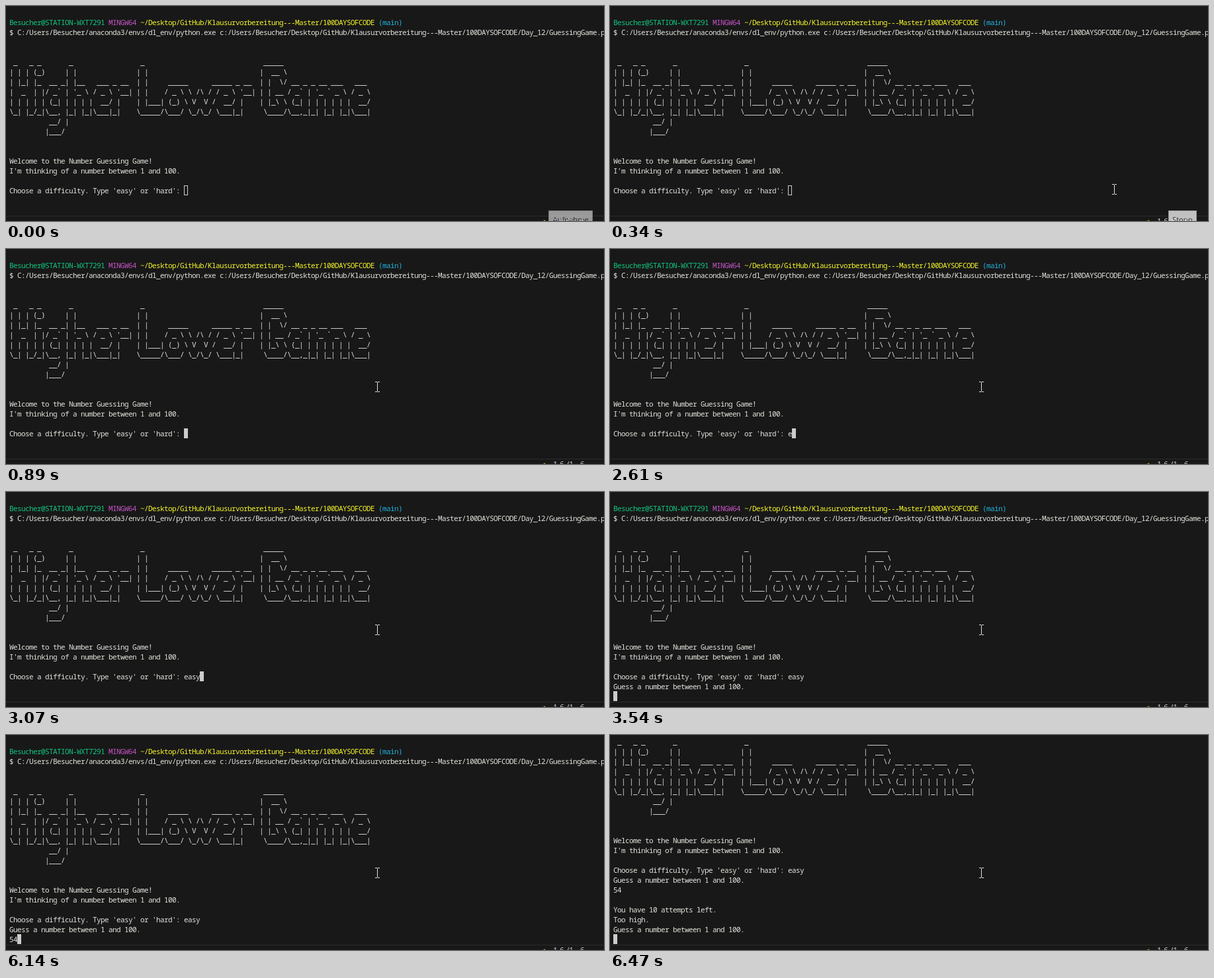
Animation of 904 by 326 pixels, one loop 8 s. Source, as an HTML page:

```html
<!DOCTYPE html>
<html lang="en">
<head>
<meta charset="utf-8">
<title>Number guessing game</title>
<style>
  html, body { margin: 0; width: 100%; height: 100%; overflow: hidden; background: #181818; }
  svg { display: block; width: 904px; height: 326px; }
  text { white-space: pre; }
  #log text { font: 500 11px "Noto Sans Mono", monospace; letter-spacing: -.6px; fill: #e2e2dc; }
  #log .user { fill: #0fc781; }
  #log .sys { fill: #c653c6; }
  #log .dir { fill: #f5f52a; }
  #log .branch { fill: #22b2dc; }
  .status { font: 12px "Open Sans", sans-serif; fill: #ccc; }
  .tip rect { fill: #f0f0f0; stroke: #b8b8b8; }
  .tip text { font: 11.2px "Open Sans", sans-serif; fill: #333; }
</style>
</head>
<body>
<svg viewBox="0 0 904 326">
  <rect width="904" height="326" fill="#181818"/>
  <g id="log"></g>
  <rect id="caret" width="6" height="15" fill="#ccc"/>
  <rect id="hollow" x="269.5" y="272.5" width="5" height="14" fill="none" stroke="#ccc"/>
  <rect y="318" width="904" height="1" fill="#2b2b2b"/>
  <circle cx="814" cy="326" r="1.5" fill="#c98a3a"/>
  <text class="status" x="827" y="331">1 6 /1 . 6</text>
  <g class="tip" id="record">
    <rect x="820.5" y="310.5" width="66" height="24"/>
    <text x="826.5" y="328">Aufnahme</text>
  </g>
  <g class="tip" id="stop">
    <rect x="844.5" y="310.5" width="42" height="24"/>
    <text x="850" y="328">Stopp</text>
  </g>
  <path id="mouse" d="M-3 -7.5H0M1 -7.5H4M.5 -7V7M-3 7.5H0M1 7.5H4" fill="none" stroke="#e4e4e4"/>
</svg>
<script>
const LOOP = 8000, CELL = 6, ROW = 15, LEFT = 5, TOP = 2;
const $ = id => document.getElementById(id);
const log = $('log');

// ~ stands for a backtick
const banner = String.raw`
 _   _ _       _                 _                              _____
| | | (_)     | |               | |                            |  __ \
| |_| |_  __ _| |__   ___ _ __  | |     _____      _____ _ __  | |  \/ __ _ _ __ ___   ___
|  _  | |/ _~ | '_ \ / _ \ '__| | |    / _ \ \ /\ / / _ \ '__| | | __ / _~ | '_ ~ _ \ / _ \
| | | | | (_| | | | |  __/ |    | |___| (_) \ V  V /  __/ |    | |_\ \ (_| | | | | | |  __/
\_| |_/_|\__, |_| |_|\___|_|    \_____/\___/ \_/\_/ \___|_|     \____/\__,_|_| |_| |_|\___|
          __/ |
         |___/`.replaceAll('~', '\x60').split('\n').slice(1);

function put(row, str, col = 0, cls = '') {
  const el = document.createElementNS('http://www.w3.org/2000/svg', 'text');
  el.setAttribute('x', LEFT + col * CELL);
  el.setAttribute('y', TOP + row * ROW + 12);
  el.setAttribute('class', cls);
  el.textContent = str;
  log.append(el);
  return el;
}

const folder = 'Desktop/GitHub/Klausurvorbereitung---Master/100DAYSOFCODE';
const guess = 'Guess a number between 1 and 100.';
const question = "Choose a difficulty. Type 'easy' or 'hard': ";

put(1, 'Besucher@STATION-WXT7291', 0, 'user');
put(1, 'MINGW64', 25, 'sys');
put(1, '~/' + folder, 33, 'dir');
put(1, '(main)', 93, 'branch');
put(2, '$ C:/Users/Besucher/anaconda3/envs/dl_env/python.exe c:/Users/Besucher/' +
  folder + '/Day_12/GuessingGame.py');
banner.forEach((line, i) => put(5 + i, line));
put(15, 'Welcome to the Number Guessing Game!');
put(16, "I'm thinking of a number between 1 and 100.");
put(18, question);
const level = put(18, '', question.length);
const ask = put(19, guess);
const number = put(20, '');
const reply = [put(22, 'You have 10 attempts left.'), put(23, 'Too high.'), put(24, guess)];

// [time, value] steps
const levelKeys = [[0, ''], [2610, 'e'], [2680, 'ea'], [2870, 'eas'], [3070, 'easy']];
const numberKeys = [[0, ''], [4810, '5'], [6140, '54']];
const ENTER = 3540, SCROLL = 6470, FOCUS = 820;
const recordFade = [[0, .6], [70, 0]];
const stopFade = [[0, 0], [70, .5], [200, 1], [270, .95], [340, .78], [410, .5], [480, .25], [550, 0]];
const mousePath = [
  [0, null], [270, [808, 312]], [340, [762, 278]], [410, [672, 240]], [480, [598, 217]],
  [550, [562, 210]], [750, [567, 204]], [820, [565, 206]], [890, [561, 209]]
];

const at = (steps, t) => steps.findLast(s => s[0] <= t)[1];
const show = (el, on) => { el.style.display = on ? '' : 'none'; };

function draw(t) {
  const asked = t >= ENTER, scrolled = t >= SCROLL;
  level.textContent = at(levelKeys, t);
  number.textContent = at(numberKeys, t);
  show(ask, asked);
  reply.forEach(el => show(el, scrolled));
  log.setAttribute('transform', `translate(0 ${scrolled ? -5 * ROW : 0})`);

  const row = asked ? 20 : 18;
  const col = scrolled ? 0 : asked ? number.textContent.length : question.length + level.textContent.length;
  const caret = $('caret');
  caret.setAttribute('x', LEFT + col * CELL);
  caret.setAttribute('y', TOP + row * ROW);
  show(caret, t >= FOCUS);
  show($('hollow'), t < FOCUS);

  $('record').setAttribute('opacity', at(recordFade, t));
  $('stop').setAttribute('opacity', at(stopFade, t));
  const pos = at(mousePath, t);
  show($('mouse'), pos);
  if (pos) $('mouse').setAttribute('transform', `translate(${pos})`);
}

const start = performance.now();
function tick() {
  draw((performance.now() - start) % LOOP);
  requestAnimationFrame(tick);
}
tick();
</script>
</body>
</html>
```
